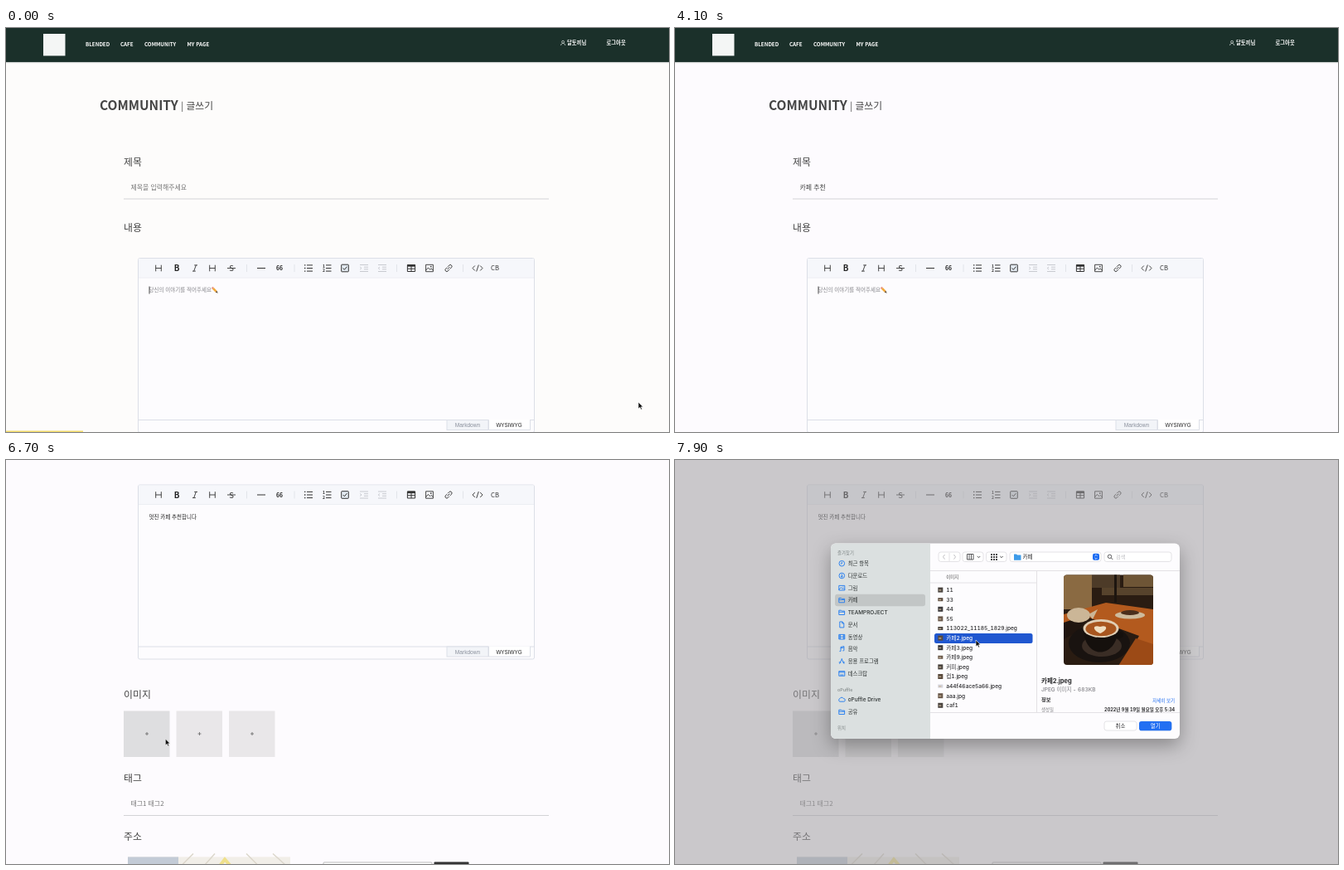
Animation, 800 px wide and 487 px high, one loop 8000 ms. Source, as an HTML page:

```html
<!DOCTYPE html>
<html lang="ko">
<head>
<meta charset="utf-8">
<style>
html, body { margin: 0; width: 100%; height: 100%; overflow: hidden; background: #fdfbfe; }
svg { display: block; }
text { white-space: pre; font-family: "Noto Sans CJK KR", "Noto Sans CJK", sans-serif; }
.ui text { font-family: Inter, "Noto Sans CJK KR", "Noto Sans CJK", sans-serif; font-weight: 500; font-variant-numeric: tabular-nums; }
.ui .b { font-weight: 700; }
.latin { font-family: "Liberation Sans", Arial, sans-serif; }
.b { font-weight: 700; }
.mid { text-anchor: middle; }
.end { text-anchor: end; }
.sheet { filter: drop-shadow(0 8px 11px rgba(0, 0, 0, .32)); }
</style>
</head>
<body>
<svg id="stage" width="800" height="487" viewBox="0 0 800 487"></svg>
<script>
const stage = document.getElementById('stage');
const $ = id => document.getElementById(id);

// y is the vertical centre of the line of text
const text = (s, x, y, size, fill = '#444', cls = '', id = '') =>
  `<text id="${id}" class="${cls}" x="${x}" y="${y + size * .37}" font-size="${size}" fill="${fill}">${s}</text>`;
const rect = (x, y, w, h, fill, more = '') =>
  `<rect x="${x}" y="${y}" width="${w}" height="${h}" fill="${fill}" ${more}/>`;
const oval = (x, y, rx, ry, fill) => `<ellipse cx="${x}" cy="${y}" rx="${rx}" ry="${ry}" fill="${fill}"/>`;
const shape = (d, fill) => `<path d="${d}" fill="${fill}"/>`;
const path = (d, stroke, more = '') => `<path d="${d}" fill="none" stroke="${stroke}" ${more}/>`;
const at = (x, y, s) => `<g transform="translate(${x} ${y})">${s}</g>`;
const hline = (x1, x2, y, c) => path(`M${x1} ${y}H${x2}`, c);
const vline = (x, y1, y2, c) => path(`M${x} ${y1}V${y2}`, c);

function header() {
  const nav = [['BLENDED', 96], ['CAFE', 138], ['COMMUNITY', 167], ['MY PAGE', 218.5]];
  return rect(0, 41, 800, 1.2, '#c9cdcc') + rect(0, 0, 800, 41, '#1b302a') +
    rect(45, 7, 26.5, 26.5, '#f4f6f5') +
    nav.map(([s, x]) => text(s, x, 19.3, 6.25, '#fff', 'b')).join('') +
    path('M669.5 21c.3-3.4 5-3.4 5.3 0M670.6 16.8a1.5 1.5 0 1 0 3 0a1.5 1.5 0 1 0-3 0', '#dfe5e2', 'stroke-width=".7"') +
    text('달토끼님', 677, 18, 6.3, '#fff', 'b') + text('로그아웃', 724.5, 18, 6.3, '#fff', 'b');
}

function toolbar() {
  const ink = '#333', dim = '#c8cad0';
  const H = path('M-3.3-3.8V3.8M3.3-3.8V3.8M-3.3 0H3.3', ink, 'stroke-width=".9"');
  const shift = d => path(`M-5-4H5M0-1.3H5M0 1.3H5M-5 4H5${d}`, dim);
  const icons = [
    [184, H],
    [206, text('B', 0, 0, 9.8, '#222', 'b mid')],
    [228, path('M-.8-3.6H3M-3 3.6H.8M1.3-3.6L-1.3 3.6', ink, 'stroke-width=".9"')],
    [249, H],
    [272, text('S', 0, 0, 9.5, ink, 'mid') + path('M-5 0H5', ink, 'stroke-width=".9"')],
    [308, path('M-5 0H5', ink)],
    [330, text('66', 0, .3, 6.8, '#222', 'b mid')],
    [365, path('M-2-3.6H5M-2 0H5M-2 3.6H5', ink) + path('M-5-3.6h1.4M-5 0h1.4M-5 3.6h1.4', ink, 'stroke-width="1.4"')],
    [387, path('M-1-3.6H5.5M-1 0H5.5M-1 3.6H5.5', ink) + text('1', -5, -2.7, 5, ink, 'b') + text('2', -5, 2.9, 5, ink, 'b')],
    [409, rect(-4.3, -4.3, 8.6, 8.6, '#e3eaf1', `stroke="${ink}" rx=".6"`) + path('M-2.3 0L-.6 1.8L2.4-1.8', ink)],
    [432, shift('M-4.8-1.5L-3 0L-4.8 1.5')],
    [454, shift('M-3-1.5L-4.8 0L-3 1.5')],
    [489, path('M-4.6-4H4.6V4H-4.6ZM-4.6.7H4.6M0-3V4', ink) + rect(-4.6, -4.4, 9.2, 2.6, ink)],
    [511, path('M-4.4-4.2H4.4V4.2H-4.4ZM-4.4 2.6L-1.5-.6L.6 1.8L2 .4L4.4 2.6', ink, 'stroke-width=".9"') + rect(1, -2.6, 1.5, 1.5, ink)],
    [534, `<g transform="rotate(-45)">${path('M-.6-1.9H-3a1.9 1.9 0 0 0 0 3.8H-.6M.6-1.9H3a1.9 1.9 0 0 1 0 3.8H.6M-2 0H2', ink, 'stroke-width=".9"')}</g>`],
    [569, path('M-3.2-3L-6 0L-3.2 3M3.2-3L6 0L3.2 3M1.3-4L-1.3 4', ink, 'stroke-width=".9"')],
    [590, text('CB', 0, 0, 7.6, ink, 'mid')]
  ];
  return icons.map(([x, s]) => at(x, 289.5, s)).join('') +
    [290.5, 348, 471.5, 551.5].map(x => vline(x, 285, 294, '#e2e4ea')).join('');
}

function editor() {
  const line = '#dcdfe7';
  return rect(159.5, 277.5, 478, 210, '#fdfcfe', `stroke="${line}" rx="2"`) +
    rect(160, 278, 477, 23, '#f6f7fb') + hline(160, 637, 301, '#eceef3') + toolbar() +
    hline(160, 637, 472.5, line) +
    rect(532, 472.5, 50, 12, '#f2f4f8', `stroke="${line}"`) +
    rect(582.5, 472, 49.5, 12.5, '#fff') + path('M582.5 472.5V484.5H632.5V472.5', line) +
    text('Markdown', 557, 478.8, 6.6, '#8a909c', 'latin mid') +
    text('WYSIWYG', 607, 478.8, 6.3, '#222', 'latin mid') +
    text('', 172.5, 316, 6.5, '#222', '', 'body') +
    `<g id="hint">${text('당신의 이야기를 적어주세요', 172.5, 316, 6.5, '#85858a')}
      ${at(252, 316, `<g transform="rotate(45)">${rect(-4.8, -1.3, 2, 2.6, '#e9988c')}${rect(-2.9, -1.3, 5.2, 2.6, '#f2a93b')}
      ${shape('M2.3-1.3L5.2 0L2.3 1.3Z', '#5b4a35')}</g>`)}</g>`;
}

function lowerForm() {
  const tiles = [142, 205.5, 269].map((x, i) =>
    rect(x, 550, 55.5, 55.5, i ? '#e9e7e9' : '#e7e8ea', `id="tile${i}"`) +
    path(`M${x + 26} 577.5h4M${x + 28} 575.5v4`, '#666', 'stroke-width=".8"')).join('');
  const map = rect(147, 726, 196, 60, '#f1eee8') + rect(147, 726, 61, 60, '#c3cbd6') +
    path('M208 740L226 722M236 740L252 722M290 722L308 740M322 722L342 740', '#dcd7cc', 'stroke-width="1.5"') +
    path('M257 738L264 729L272 738', '#efe08c', 'stroke-width="4"');
  return text('이미지', 142, 530.2, 11.9) + tiles +
    text('태그', 142, 631, 11.9) + text('태그1 태그2', 150.5, 661.8, 7.9, '#757575') +
    hline(142, 655, 676, '#d3d3d6') + text('주소', 142, 701.5, 11.9) + map +
    rect(383, 732.5, 131, 30, '#fff', 'stroke="#bbb" rx="1"') + rect(516.5, 732, 42, 30, '#333', 'rx="1"');
}

function sidebar() {
  const folder = 'M-3.5-2.5H-.8L0-1.6H3.3V2.8H-3.5ZM-3.5-.5H3.3';
  const box = 'M-3.5-2.8H3.5V2.8H-3.5Z';
  const items = [
    ['최근 항목', 'M-3.3 0a3.3 3.3 0 1 0 6.6 0a3.3 3.3 0 1 0-6.6 0M0-2V.3H-1.6'],
    ['다운로드', 'M-3.3 0a3.3 3.3 0 1 0 6.6 0a3.3 3.3 0 1 0-6.6 0M0-2V1.8M-1.4.5L0 1.8L1.4.5'],
    ['그림', box + 'M-3.5 2L-1-.6L1 1.2L2 .4L3.5 2M1-1.2h1'],
    ['카페', folder], ['TEAMPROJECT', folder],
    ['문서', 'M-2.5-3.5H.7L2.5-1.6V3.5H-2.5ZM.5-3.3V-1.4H2.4'],
    ['동영상', box + 'M-2-2.8V2.8M2-2.8V2.8M-2 0H2M-3.5-1H-2M-3.5 1H-2M2-1H3.5M2 1H3.5'],
    ['음악', 'M-1.3 2.5V-2.5L2.6-3.3V1.8M-1.3-1.2L2.6-2M-2.8 2.6h1.4M1.1 1.9h1.4'],
    ['응용 프로그램', 'M.3-3.2L-2.8 3M-.3-3.2L2.8 3M-3.6 1.2H-1M1 1.2H3.6'],
    ['데스크탑', box + 'M-3.5-1.6H3.5M-2 1.6H2']
  ];
  const row = ([s, d], y) => at(201.3, y, path(d, '#1f7af0', 'stroke-width=".9"')) +
    text(s, 208.7, y, 6.4, '#2e3333');
  const head = (s, y) => text(s, 196, y, 5.4, '#838a8a');
  return shape('M308 100.5H194a6 6 0 0 0-6 6V330a6 6 0 0 0 6 6H308Z', '#dbe0e0') +
    rect(193, 161.7, 109, 14.6, '#c2c6c6', 'rx="3"') +
    head('즐겨찾기', 112) + items.map((it, i) => row(it, 124.7 + 14.75 * i)).join('') +
    head('oPuffle', 277) +
    row(['oPuffle Drive', 'M-2.2 2.2a1.8 1.8 0 0 1-.2-3.5A2.4 2.4 0 0 1 2-1.4a1.8 1.8 0 0 1 .4 3.6Z'], 289) +
    row(['공유', folder], 303.7) + head('위치', 323.3);
}

function photo() {
  return `<clipPath id="clip">${rect(469, 138.5, 108, 108.5, '#000', 'rx="4"')}</clipPath><g clip-path="url(#clip)">` +
    rect(469, 138, 108, 110, '#2a1c12') + rect(469, 138, 34, 42, '#8a6a42') + rect(503, 138, 34, 16, '#4d3b28') +
    rect(541, 138, 36, 15, '#6e5536') + rect(515, 154, 62, 9, '#57432c') + rect(530, 138, 3, 34, '#1d150f') +
    shape('M469 186L520 172L577 180V248H540L560 212L500 190L469 204Z', '#b35a1e') +
    shape('M535 248L556 215L577 222V248Z', '#9c4a16') + shape('M469 196L505 184L484 208L469 216Z', '#20150f') +
    oval(487, 187, 14, 9, '#cbb697') + shape('M499 186l11-6-6 12z', '#cbb697') +
    oval(549, 187, 18, 4.5, '#cdbb9d') + oval(549, 184, 11, 3, '#4a2f1c') +
    oval(512, 221, 37, 23, '#191310') + oval(515, 224, 24, 13, '#3a2d25') +
    shape('M493 203c0 38 40 38 42 0z', '#15100d') + oval(536, 211, 5, 4, '#15100d') +
    oval(514, 203, 21.5, 11, '#e0cfb5') + oval(514, 203.5, 18.5, 8.8, '#a8561f') +
    shape('M513 209c-11-5-8-11 0-8c8-3 11 3 0 8z', '#f0dfc2') + '</g>';
}

function fileList() {
  const files = ['11', '33', '44', '55', '113022_11185_1829.jpeg', '카페2.jpeg', '카페3.jpeg', '카페9.jpeg',
    '커피.jpeg', '컵1.jpeg', 'a44f46ace5a66.jpeg', 'aaa.jpg', 'caf1'];
  const tones = ['#4b4540', '#5a4a3d', '#3c3a3c', '#6b5a4c'];
  return rect(313, 209, 118.5, 12, '#2057d0', 'rx="2.5" id="rowMark"') +
    files.map((s, i) => {
      const y = 156.6 + 11.6 * i, h = i % 3 == 1 ? 4 : 6;
      return rect(317.3, y - h / 2, 6, h, i == 10 ? '#d5d5dc' : tones[i % 4]) +
        rect(318.3, y - .3, 3, 1.2, '#c9b59b') +
        text(s, 327.3, y, 6.6, '#2a2a2c', '', i == 5 ? 'rowName' : '');
    }).join('');
}

function dialog() {
  const line = '#e3e1e5', ink = '#4a4a4d';
  const button = (x, w, y = 111, h = 11.5) => rect(x, y, w, h, '#fff', `stroke="#dddce0" stroke-width=".8" rx="2.8"`);
  const down = (x, y) => path(`M${x - 1.7} ${y - .8}l1.7 1.7l1.7-1.7`, ink);
  const grid = [381, 384, 387].map(x => [114, 117, 120].map(y => rect(x, y - 1, 2, 2, ink)).join('')).join('');
  return rect(188, 100.5, 421, 235.5, '#fdfcfe', 'rx="6" class="sheet"') + sidebar() +
    button(318, 26) + vline(331, 112, 122, line) +
    path('M325.5 114l-2 2.8l2 2.8M336.5 114l2 2.8l-2 2.8', '#b9b8bd', 'stroke-width=".9"') +
    button(347, 25) + path('M352.5 113.5h7.5v6.5h-7.5zM355 113.5v6.5M357.5 113.5v6.5', ink, 'stroke-width=".9"') + down(366.5, 116.8) +
    button(375.5, 24.5) + grid + down(394, 116.8) +
    button(404, 110) + shape('M409 113.5h3l1 1h4.5v6.3H409z', '#3d9be9') + text('카페', 419.5, 116.8, 6.5, '#2a2a2c') +
    rect(504, 112.8, 8, 8, '#1b6cf2', 'rx="2"') + path('M506.6 115.7L508 114.3L509.4 115.7M506.6 118L508 119.4L509.4 118', '#fff', 'stroke-width=".8"') +
    button(518, 81) + path('M522.3 116.3a2.2 2.2 0 1 0 4.4 0a2.2 2.2 0 1 0-4.4 0M526.3 118l2 2', ink, 'stroke-width=".9"') +
    text('검색', 532, 116.8, 6.2, '#bdbcc1') +
    hline(308, 609, 133.5, line) + text('이미지', 327.3, 140.8, 5.4, '#555') + hline(308, 436, 148, line) +
    vline(436.5, 133.5, 304.5, line) + fileList() + hline(308, 609, 304.5, line) +
    button(518, 39, 315, 11) + text('취소', 537.5, 320.5, 6.4, '#2a2a2c', 'mid') +
    button(560.5, 38.5, 315, 11) + rect(560, 315, 39.3, 11.2, '#2270f2', 'rx="2.8" id="openFill"') +
    text('열기', 579.7, 320.5, 6.4, '#bbb', 'mid', 'openText') +
    `<g id="preview">${photo()}</g><g id="meta">` + text('카페2.jpeg', 442, 266.3, 7.5, '#2a2a2c', 'b') +
    text('JPEG 이미지 - 683KB', 442, 277, 6.5, '#808085') + text('정보', 442, 289, 6.2, '#2a2a2c', 'b') +
    text('자세히 보기', 603, 289.5, 5.5, '#1b6af0', 'end') + text('생성일', 442, 301, 5.4, '#808085') +
    text('2022년 9월 19일 월요일 오후 5:34', 603, 301, 5.5, '#2a2a2c', 'b end') + '</g>';
}

stage.innerHTML = rect(0, 0, 800, 487, '#fdfbfe', 'id="bg"') +
  `<g id="page">${header()}` +
  text('COMMUNITY', 113, 93, 15.5, '#444', 'b') + text('|', 211.2, 94, 11) + text('글쓰기', 217.5, 94, 11.8) +
  text('제목', 142, 161.5, 11.9) + text('', 150.5, 192, 7.9, '#444', '', 'title') +
  hline(142, 655, 206, '#d3d3d6') + text('내용', 142, 240.3, 11.9) + editor() + lowerForm() +
  rect(0, 0, .8, 9, '#222', 'id="caret"') + '</g>' +
  rect(0, 485.5, 93, 1.5, '#f3dc6a', 'id="progress"') + rect(0, 0, 800, 487, '#a09ea1', 'id="veil"') +
  `<g id="dialog" class="ui">${dialog()}</g>
  <path id="arrow" d="M0 0V8L1.9 6.3L3.2 9L4.5 8.4L3.3 5.8H5.7Z" fill="#111" stroke="#fff" stroke-width=".6"/>
  <path id="beam" d="M-1.7-4.5Q0-4.5 0-3.2V3.2Q0 4.5-1.7 4.5M1.7-4.5Q0-4.5 0-3.2M0 3.2Q0 4.5 1.7 4.5" fill="none" stroke="#333" stroke-width=".8"/>`;

// Every state of the text while syllables are being composed
function keystrokes(...words) {
  const states = [];
  let done = '';
  words.forEach((w, i) => {
    if (i) states.push(done += ' ');
    const steps = w.split(' ');
    steps.forEach(s => states.push(done + s));
    done += steps.at(-1);
  });
  return states;
}
const titleKeys = keystrokes('ㅋ 카 캎 카페', 'ㅊ 추 춫 추처 추천');
const bodyKeys = keystrokes('ㅁ 머 멋 멋ㅈ 멋지 멋진', 'ㅋ 카 캎 카페',
  'ㅊ 추 춫 추처 추천 추천ㅎ 추천하 추천합 추천합ㄴ 추천합니 추천합닏 추천합니다');
const typed = (keys, t, start, step) => t < start ? '' : keys[Math.min(keys.length - 1, Math.floor((t - start) / step))];

const clamp = v => Math.max(0, Math.min(1, v));
const ease = v => (v = clamp(v)) * v * (3 - 2 * v);
const show = (id, on) => $(id).setAttribute('visibility', on ? 'inherit' : 'hidden');
const move = (id, x, y) => $(id).setAttribute('transform', `translate(${x} ${y})`);

function fill(id, s, composing) {
  const html = composing && s && !s.endsWith(' ')
    ? s.slice(0, -1) + `<tspan text-decoration="underline">${s.at(-1)}</tspan>` : s;
  const el = $(id);
  if (el.dataset.html !== html) el.innerHTML = el.dataset.html = html;
}

// time, x, y
const route = [[0, 763, 451], [800, 763, 451], [1250, 330, 192], [2700, 330, 192], [3200, 329.5, 337],
  [6500, 240, 345], [6800, 176, 333], [7100, 176, 333], [7650, 363, 217], [8000, 363, 217]];
function pointer(t) {
  const i = route.findIndex(p => p[0] > t), a = route[i - 1], b = route[i];
  const k = ease((t - a[0]) / (b[0] - a[0]));
  return [a[1] + (b[1] - a[1]) * k, a[2] + (b[2] - a[2]) * k];
}

function draw() {
  const t = performance.now() % 8000;
  const inTitle = t >= 1300 && t < 3300;
  const title = typed(titleKeys, t, 1500, 125), body = typed(bodyKeys, t, 4400, 57);

  show('progress', t < 200);
  $('bg').setAttribute('fill', t < 200 ? '#fdfcfb' : '#fdfbfe');
  fill('title', title || '제목을 입력해주세요', title && inTitle);
  $('title').setAttribute('fill', title ? '#444' : '#757575');
  fill('body', body, t < 6700);
  show('hint', !body);

  const typing = t > 1500 && t < 2700 || t > 4400 && t < 5750;
  const blink = t % 1000 > 50 && t % 1000 < 550;
  show('caret', t < 6700 && (typing || t < 550 || blink));
  const [id, s, x, y] = inTitle ? ['title', title, 151, 187.5] : ['body', body, 172.6, 311.5];
  move('caret', x + (s ? $(id).getComputedTextLength() : 0), y);

  move('page', 0, -247.5 * ease((t - 6000) / 700));
  $('tile0').setAttribute('fill', t > 6700 ? '#dedee0' : '#e7e8ea');

  const open = t >= 6850, k = clamp((t - 6850) / 250), picked = t >= 7600;
  show('dialog', open);
  move('dialog', 0, -6.9 * (1 - k));
  $('veil').setAttribute('opacity', open ? .265 + .275 * k : 0);
  ['rowMark', 'openFill', 'preview'].forEach(part => show(part, open && picked));
  show('meta', t >= 7700);
  $('rowName').setAttribute('fill', picked ? '#fff' : '#2a2a2c');
  $('openText').setAttribute('fill', picked ? '#fff' : '#bbb');

  const spot = pointer(t);
  show('arrow', t < 1200 || t >= 6500);
  show('beam', t >= 1200 && t < 1500 || t >= 2700 && t < 3300);
  move('arrow', ...spot);
  move('beam', ...spot);
  requestAnimationFrame(draw);
}
draw();
</script>
</body>
</html>
```
